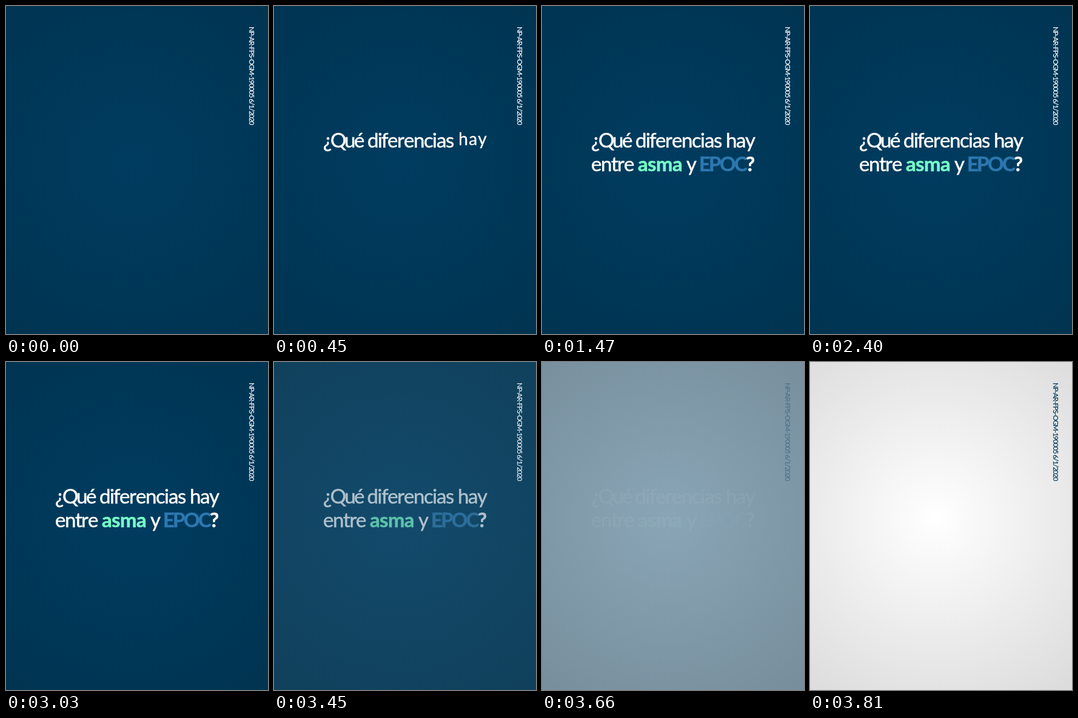
These frames come from a looping animation (432 px wide and 540 px high, 3.84 s). An HTML page:

```html
<!DOCTYPE html>
<html lang="es">
<head>
<meta charset="utf-8">
<style>
  html, body { margin: 0; width: 100%; height: 100%; overflow: hidden; }
  #stage { position: relative; width: 432px; height: 540px; overflow: hidden; color: #fff;
    font-family: Lato, sans-serif;
    background: radial-gradient(circle 350px at 207px 258px, #003c60, #003451); }
  #light { position: absolute; inset: 0;
    background: radial-gradient(circle 350px at 207px 258px, #fff, #dcdcdd); }
  #code { position: absolute; left: 412px; top: 34px; white-space: nowrap;
    font-size: 11.5px; line-height: 14px; letter-spacing: -.95px;
    -webkit-text-stroke: .2px;
    transform-origin: 0 0; transform: rotate(90deg); }
  .word { position: absolute; white-space: nowrap;
    font-size: 33px; line-height: 40px; letter-spacing: -1.4px;
    -webkit-text-stroke: .5px; }
  .word span { display: inline-block; transform-origin: 50% 8px; }
  .bold { font-weight: 700; letter-spacing: -.7px; }
  .tight { letter-spacing: -2.8px; }
  .asma { color: #78ffc8; }
  .epoc { color: #2c78b0; }
</style>
</head>
<body>
<div id="stage">
  <div id="title"></div>
  <div id="light"></div>
  <div id="code">NP-AR-FPS-OGM-190005 6/1/2020</div>
</div>
<script>
const LOOP = 3840, POP = 190;
const title = document.getElementById('title');
const light = document.getElementById('light');
const code = document.getElementById('code');

// text, left, top, start time, style
const words = [
  ['¿Qué', 81, 199.5, 10, 'tight'],
  ['diferencias', 153.5, 199.5, 170, ''],
  ['hay', 303, 199.5, 335, ''],
  ['entre', 81, 238.5, 550, ''],
  ['asma', 158, 238.5, 740, 'bold asma'],
  ['y', 238, 238.5, 960, ''],
  ['EPOC', 259, 238.5, 1150, 'bold tight epoc'],
  ['?', 336, 238.5, 1150, 'bold'],
].map(([text, left, top, start, style]) => {
  const word = document.createElement('div');
  word.className = 'word ' + style;
  word.style.left = left + 'px';
  word.style.top = top + 'px';
  const letters = [...text].map(char => {
    const letter = document.createElement('span');
    letter.textContent = char;
    return word.appendChild(letter);
  });
  title.append(word);
  return { letters, start };
});

const progress = (t, from, to) => Math.min(1, Math.max(0, (t - from) / (to - from)));
const mix = (a, b, k) => a + (b - a) * k;

function draw(t) {
  for (const { letters, start } of words) {
    const scale = 1 - (1 - progress(t, start, start + POP)) ** 2;
    for (const letter of letters) letter.style.transform = `scale(${scale})`;
  }
  title.style.opacity = 1 - progress(t, 3335, 3680);

  const fade = progress(t, 3380, 3810) ** 1.45;
  light.style.opacity = fade;
  const ink = Math.min(1, fade * 1.3);
  code.style.color = `rgb(${mix(255, 0, ink)}, ${mix(255, 58, ink)}, ${mix(255, 95, ink)})`;
}

const begin = performance.now();
function tick() {
  draw((performance.now() - begin) % LOOP);
  requestAnimationFrame(tick);
}
tick();
</script>
</body>
</html>
```
